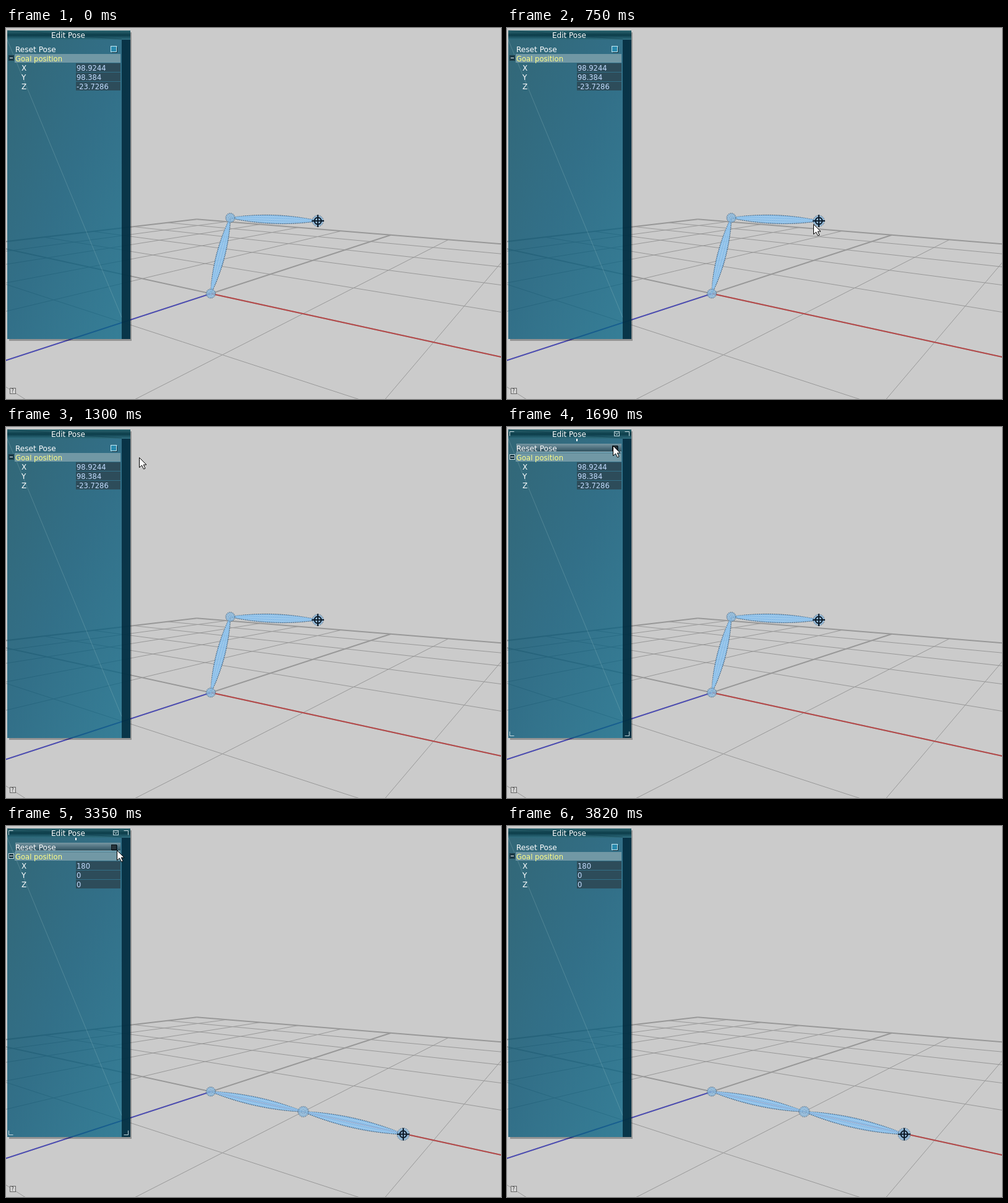
Animation, 800 px wide and 600 px high, one loop 4.47 s. Source, as an HTML page with a canvas:

```html
<!DOCTYPE html>
<html>
<head>
<meta charset="utf-8">
<style>
html, body { margin: 0; width: 100%; height: 100%; overflow: hidden; background: #cbcbcb }
canvas { display: block }
</style>
</head>
<body>
<canvas id="stage" width="800" height="600"></canvas>
<script>
const ctx = document.getElementById('stage').getContext('2d');
const LOOP = 4470, RESET_AT = 2380;
const TRIM = '#c6dce2';

// Pointer keys: time, x, y of the tip
const pointerPath = [[320, 701, 590], [510, 578, 421], [830, 468, 283], [970, 367, 190],
  [1180, 258, 84], [1360, 194, 32], [1500, 182, 29], [1690, 171, 30], [3310, 171, 30],
  [3350, 178, 38], [3450, 235, 105], [3600, 385, 250], [3820, 640, 600]];

function pointerAt(t) {
  const i = pointerPath.findIndex(key => key[0] > t);
  if (i < 1) return null;
  const [a, b] = [pointerPath[i - 1], pointerPath[i]];
  const k = (t - a[0]) / (b[0] - a[0]);
  return [a[1] + (b[1] - a[1]) * k, a[2] + (b[2] - a[2]) * k];
}

function rect(x, y, w, h, fill) {
  ctx.fillStyle = fill;
  ctx.fillRect(x, y, w, h);
}

function frame(x, y, w, h, color) {
  ctx.lineWidth = 1;
  ctx.strokeStyle = color;
  ctx.strokeRect(x + .5, y + .5, w - 1, h - 1);
}

function strokePath(color, width, dash) {
  ctx.strokeStyle = color;
  ctx.lineWidth = width;
  ctx.setLineDash(dash);
  ctx.stroke();
  ctx.setLineDash([]);
}

function line(points, color, width = 1, dash = []) {
  ctx.beginPath();
  points.forEach(p => ctx.lineTo(p[0], p[1]));
  strokePath(color, width, dash);
}

function circle(x, y, r, color, width = 1, dash = []) {
  ctx.beginPath();
  ctx.arc(x, y, r, 0, Math.PI * 2);
  strokePath(color, width, dash);
}

function text(str, x, y, color, size = 12) {
  ctx.font = size + 'px "DejaVu Sans", sans-serif';
  ctx.fillStyle = color;
  ctx.fillText(str, x, y);
}

function gradient(x0, y0, x1, y1, ...colors) {
  const g = ctx.createLinearGradient(x0, y0, x1, y1);
  colors.forEach((c, i) => g.addColorStop(i / (colors.length - 1), c));
  return g;
}

// Ground plane in perspective: homogeneous coordinates of a grid point
const ground = (x, z) => [331 + 78.48 * x + 179.2 * z, 429.6 - 35.33 * x + 46.2 * z, 1 - .1469 * x + .1946 * z];

function groundLine(far, near, color, width) {
  const p = ground(...far), q = ground(...near);
  const k = Math.min(1, (p[2] - .1) / Math.max(.001, p[2] - q[2]));
  const end = p.map((v, i) => v + (q[i] - v) * k);
  line([p, end].map(v => [v[0] / v[2], v[1] / v[2]]), color, width);
}

function drawGrid() {
  for (let i = -5; i <= 5; i++) {
    const width = i % 5 ? 1 : 2;
    groundLine([-5, i], [5, i], '#989898', width);
    groundLine([i, 5], [i, -5], '#989898', width);
  }
  groundLine([0, 0], [5, 0], '#b54848', 2);
  groundLine([0, 0], [0, -5], '#4a4ab5', 2);
}

// Translucent spindle under a dotted wire mesh
function drawBone([x0, y0], [x1, y1], half) {
  const length = Math.hypot(x1 - x0, y1 - y0);
  const edge = side => Array.from({ length: 25 }, (_, i) =>
    [length * i / 24, side * half * Math.sin(Math.PI * i / 24) ** .8]);
  ctx.save();
  ctx.translate(x0, y0);
  ctx.rotate(Math.atan2(y1 - y0, x1 - x0));
  ctx.beginPath();
  [...edge(1), ...edge(-1).reverse()].forEach(p => ctx.lineTo(...p));
  ctx.fillStyle = 'rgba(140,196,240,.8)';
  ctx.fill();
  for (let i = -5; i <= 5; i++) {
    const color = Math.abs(i) > 3 ? '#4f687f' : i % 2 ? '#6fb2ea' : '#a5d2f4';
    line(edge(Math.sin(i * Math.PI / 10)), color, 1, [1.5, 1.5]);
  }
  ctx.restore();
}

function drawJoint([x, y], r) {
  ctx.beginPath();
  ctx.arc(x, y, r, 0, Math.PI * 2);
  ctx.fillStyle = 'rgba(140,190,228,.75)';
  ctx.fill();
  for (const k of [1, .8, .4])
    circle(x, y, r * k, k === 1 ? '#46596b' : '#6c93b5', 1, [1.5, 1.5]);
}

function drawArm(reset) {
  const base = [331, 429.5];
  const knee = reset ? [480.5, 462] : [362.5, 307];
  const goal = reset ? [642, 498.5] : [504, 312];
  drawBone(base, knee, 7);
  drawBone(knee, goal, reset ? 8 : 7);
  drawJoint(base, 7.5);
  drawJoint(knee, reset ? 8.5 : 7.5);
  drawJoint(goal, reset ? 10 : 9);
  const [x, y] = goal, ink = '#0c1a28';
  circle(x, y, 5.5, ink, 2);
  line([[x - 10, y], [x + 10, y]], ink, 2);
  line([[x, y - 10], [x, y + 10]], ink, 2);
}

function drawPanel(reset, hover, rowHover) {
  rect(5, 503, 198, 3, 'rgba(0,0,0,.28)');
  rect(201, 7, 2, 496, 'rgba(0,0,0,.28)');
  rect(2, 19, 199, 484, gradient(2, 19, 333, 159, 'rgba(4,73,94,.77)', 'rgba(4,84,116,.77)', 'rgba(9,103,135,.77)'));
  rect(187, 19, 14, 484, 'rgba(2,42,60,.85)');
  rect(2, 4, 199, 15, gradient(0, 4, 0, 19, '#2b6570', '#0c3d4a', '#316f80'));
  line([[2, 19], [187, 468]], 'rgba(170,205,205,.25)');
  line([[2, 4], [187, 18]], 'rgba(10,50,65,.4)');
  text('Edit Pose', 73, 16, '#fff');

  if (hover) {
    for (const [x, dx] of [[4.5, 7], [197.5, -7]])
      for (const [y, dy] of [[7.5, 7], [499.5, -7]])
        line([[x + dx, y], [x, y], [x, y + dy]], TRIM);
    rect(112, 19, 2, 4, '#fff');
    frame(173, 7, 9, 8, TRIM);
    line([[175, 9], [177.5, 12.5], [180, 9]], TRIM);
  }

  if (rowHover) {
    rect(15, 27, 170, 14, gradient(15, 27, 15, 41, '#7797a3', '#4f6f7d', '#2b4d5a'));
    rect(15, 40, 170, 1, '#b9dae3');
  }
  text('Reset Pose', 15, 39, '#fff', 12.1);
  rect(171, 31, 9, 9, '#12313e');
  if (rowHover) {
    rect(170, 30, 9, 9, '#0b141a');
    rect(171, 31, 7, 7, '#27333a');
  } else {
    rect(169, 29, 10, 10, '#c4eaf5');
    rect(170, 30, 8, 8, '#2889ad');
  }

  rect(14, 42, 171, 14, '#7198a5');
  rect(4, 44, 9, 9, '#1c3c48');
  if (hover) frame(4, 44, 9, 9, TRIM);
  rect(6, 48, 5, 1, '#fff');
  text('Goal position', 15, 54, '#ffff86', 11.6);

  const values = reset ? ['180', '0', '0'] : ['98.9244', '98.384', '-23.7286'];
  values.forEach((value, i) => {
    const y = 57 + 15 * i;
    rect(113, y, 72, 14, '#2d4c5a');
    text('XYZ'[i], 25, y + 12, '#fff');
    text(value, 114, y + 12, '#c3dcff', 11.5);
  });
}

function drawHelp() {
  rect(6, 582, 10, 10, '#666');
  rect(7, 583, 8, 8, '#d4d4d4');
  text('?', 8.5, 590, '#444', 8);
}

function drawPointer([x, y], pressed) {
  if (pressed) {
    circle(x + .5, y + .5, 10, '#000');
    circle(x + .5, y + .5, 9, '#fff');
  }
  ctx.save();
  ctx.translate(Math.round(x) + .5, Math.round(y) + .5);
  ctx.beginPath();
  for (const p of [[0, 0], [0, 16], [4, 12.5], [7, 18.5], [9.5, 17.5], [6.8, 11.5], [11.5, 11.5]])
    ctx.lineTo(...p);
  ctx.closePath();
  ctx.fillStyle = '#fff';
  ctx.fill();
  strokePath('#000', 1, []);
  ctx.restore();
}

function draw(now) {
  const t = now % LOOP;
  const reset = t >= RESET_AT;
  const tip = pointerAt(t);
  const hover = tip && tip[0] < 201 && tip[1] < 503;
  const rowHover = hover && tip[0] < 187 && tip[1] >= 27 && tip[1] < 42;
  rect(0, 0, 800, 600, '#cbcbcb');
  drawGrid();
  drawArm(reset);
  drawPanel(reset, hover, rowHover);
  drawHelp();
  if (tip) drawPointer(tip, t >= 2150 && !reset);
  requestAnimationFrame(draw);
}
requestAnimationFrame(draw);
</script>
</body>
</html>
```
